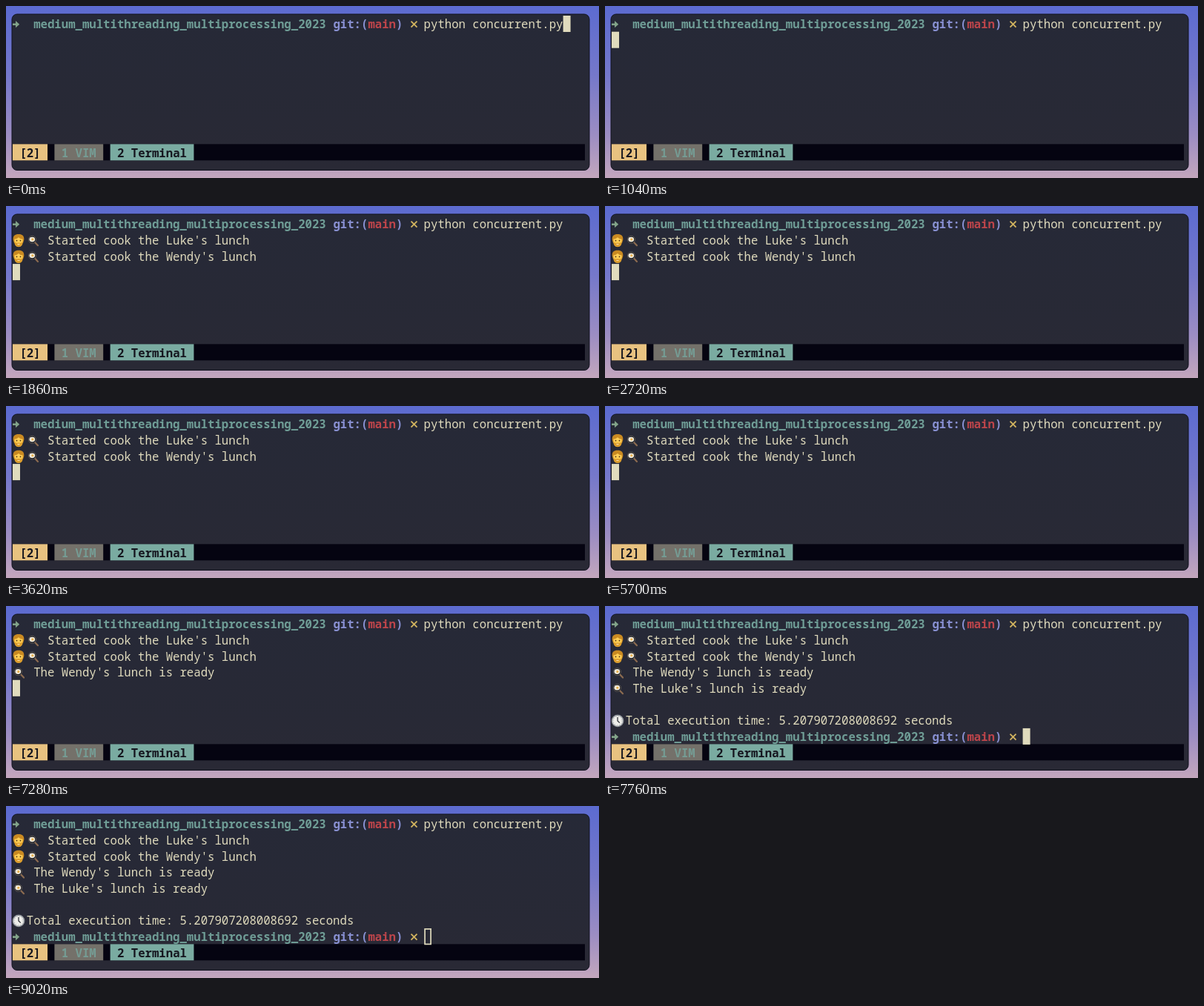
Animation of 800x232 px, one loop 9040 ms. Source, as an HTML page:

```html
<!DOCTYPE html>
<html lang="en">
<head>
<meta charset="utf-8">
<title>Concurrent lunch</title>
<style>
  html, body { margin: 0; width: 100%; height: 100%; overflow: hidden; background: #8583c8; }
  svg { display: block; width: 800px; height: 232px; }
  text {
    font: 500 15.667px "Noto Sans Mono", "DejaVu Sans Mono", monospace;
    font-variant-ligatures: none;
    white-space: pre;
  }
  .bold { font-weight: 600; }
</style>
</head>
<body>
<svg id="stage" viewBox="0 0 800 232" xmlns="http://www.w3.org/2000/svg">
  <defs>
    <linearGradient id="sky" x1="0" y1="0" x2="0" y2="1">
      <stop offset="0" stop-color="#5c6bd0"/>
      <stop offset=".4" stop-color="#7578ca"/>
      <stop offset=".75" stop-color="#9c8dc2"/>
      <stop offset="1" stop-color="#c3a6bd"/>
    </linearGradient>
    <linearGradient id="glass" x1="0" y1="0" x2="0" y2="1">
      <stop offset="0" stop-color="#262937"/>
      <stop offset="1" stop-color="#292935"/>
    </linearGradient>
    <g id="cook">
      <path d="M1.2 8C.6 2.5 4 .3 8.500 .4C13 .3 16.400 2.600 15.800 8L14.500 12H2.500Z" fill="#c98a22"/>
      <path d="M3 7Q6.500 6.500 8.500 4.500Q11 7 14 7V11Q13.500 17 8.500 17Q3.500 17 3 11Z" fill="#ffcf55"/>
      <path d="M3 10Q4 13 8.500 11.700Q13 13 14 10Q14.500 17.500 8.500 17.600Q2.500 17.500 3 10Z" fill="#dc9d2c"/>
      <path d="M6.300 13.600Q8.500 15.300 10.700 13.600Z" fill="#fff1d8"/>
      <circle cx="6" cy="9" r=".9" fill="#513315"/>
      <circle cx="11" cy="9" r=".9" fill="#513315"/>
    </g>
    <g id="pan">
      <path d="M8.500 8.500L13 13.300" stroke="#8b6b50" stroke-width="2.200" stroke-linecap="round"/>
      <circle cx="5.400" cy="5.400" r="5" fill="#11131b" stroke="#6e6860" stroke-width=".8"/>
      <ellipse cx="5.300" cy="5.200" rx="3.900" ry="3.400" fill="#eee7d8"/>
      <circle cx="5.800" cy="5.200" r="1.500" fill="#e9ad43"/>
    </g>
    <g id="clock">
      <circle cx="8.500" cy="8.500" r="7.600" fill="#eeeeea" stroke="#92979d" stroke-width="1.500"/>
      <circle cx="8.500" cy="8.500" r="5.900" fill="none" stroke="#777b82" stroke-width=".9" stroke-dasharray=".7 2.390"/>
      <path d="M8.500 3.500V8.500L11.300 11.200" fill="none" stroke="#25272d" stroke-width="1.200"/>
    </g>
  </defs>
  <rect width="800" height="232" fill="url(#sky)"/>
  <rect x="8" y="11" width="779" height="210.500" rx="7" fill="url(#glass)" stroke="#10121e"/>
</svg>
<script>
  const LOOP = 9040, LEFT = 9, CELL = 9.4, TOP = 13.2, ROW = 21.7;
  const CREAM = '#e0dbbd', TEAL = '#6f9d96', DARK = '#15161f';
  const at = { enter: 500, start: 1680, first: 6000, done: 7440, blur: 8600 };
  const stage = document.getElementById('stage');
  const colX = c => LEFT + c * CELL;
  const rowY = r => TOP + r * ROW;

  function add(tag, attrs, parent = stage) {
    const el = document.createElementNS('http://www.w3.org/2000/svg', tag);
    for (const key in attrs) el.setAttribute(key, attrs[key]);
    return parent.appendChild(el);
  }

  function write(col, row, str, fill = CREAM, parent = stage, bold = false) {
    const el = add('text', { x: colX(col), y: rowY(row) + 17, fill }, parent);
    if (bold) el.setAttribute('class', 'bold');
    el.textContent = str;
  }

  function icon(name, x, row, dy, parent) {
    add('use', { href: '#' + name, x, y: rowY(row) + dy }, parent);
  }

  function prompt(row, parent) {
    const y = rowY(row) + 11.5;
    add('path', {
      d: `M9 ${y - 1.3}h4v-3.300l5.200 4.600l-5.200 4.600v-3.300h-4z`, fill: '#82a389'
    }, parent);
    write(3, row, 'medium_multithreading_multiprocessing_2023', TEAL, parent, true);
    write(46, row, 'git:(', '#8991d3', parent, true);
    write(51, row, 'main', '#bd454b', parent, true);
    write(55, row, ')', '#8991d3', parent, true);
    add('path', {
      d: `M546.500 ${y - 4}l8 8m0-8l-8 8`, stroke: '#d2b45f', 'stroke-width': 1.8
    }, parent);
  }

  function tab(col, cells, label, fill, ink) {
    add('rect', { x: colX(col), y: 186.3, width: cells * CELL, height: 22, fill });
    write(col + 1, 8, label, ink, stage, true);
  }

  add('rect', { x: 9, y: 186.3, width: 772, height: 22, fill: '#050411' });
  tab(0, 5, '[2]', '#e8c280', DARK);
  tab(6, 7, '1 VIM', '#74716a', '#759c94');
  tab(14, 12, '2 Terminal', '#7aaba1', DARK);
  prompt(0, stage);
  write(59, 0, 'python concurrent.py');

  const started = add('g'), first = add('g'), done = add('g');
  ['Luke', 'Wendy'].forEach((name, i) => {
    icon('cook', 8.5, i + 1, 2.8, started);
    icon('pan', 30, i + 1, 5, started);
    write(5, i + 1, `Started cook the ${name}'s lunch`, CREAM, started);
  });
  function ready(row, name, parent) {
    icon('pan', 11, row, 5, parent);
    write(3, row, `The ${name}'s lunch is ready`, CREAM, parent);
  }
  ready(3, 'Wendy', first);
  ready(4, 'Luke', done);
  icon('clock', 8.5, 6, 3, done);
  write(2, 6, 'Total execution time: 5.207907208008692 seconds', CREAM, done);
  prompt(7, done);

  const cursor = add('rect', { width: 10, height: 22, fill: CREAM });
  const outline = add('rect', {
    x: colX(59) + 1.5, y: rowY(7) + 0.8, width: 8, height: 20.5,
    fill: 'none', stroke: CREAM, 'stroke-width': 1.7
  });

  // Cursor stops: time, column, row.
  const stops = [[0, 79, 0], [at.enter, 0, 1], [at.start, 0, 3], [at.first, 0, 4], [at.done, 59, 7]];
  const show = (el, on) => el.setAttribute('visibility', on ? 'visible' : 'hidden');

  function draw(t) {
    const [, col, row] = stops.filter(s => s[0] <= t).pop();
    cursor.setAttribute('x', colX(col));
    cursor.setAttribute('y', rowY(row) - 0.2);
    show(started, t >= at.start);
    show(first, t >= at.first);
    show(done, t >= at.done);
    show(cursor, t < at.blur);
    show(outline, t >= at.blur);
  }

  const origin = performance.now();
  function tick() {
    draw((performance.now() - origin) % LOOP);
    requestAnimationFrame(tick);
  }
  tick();
</script>
</body>
</html>
```
